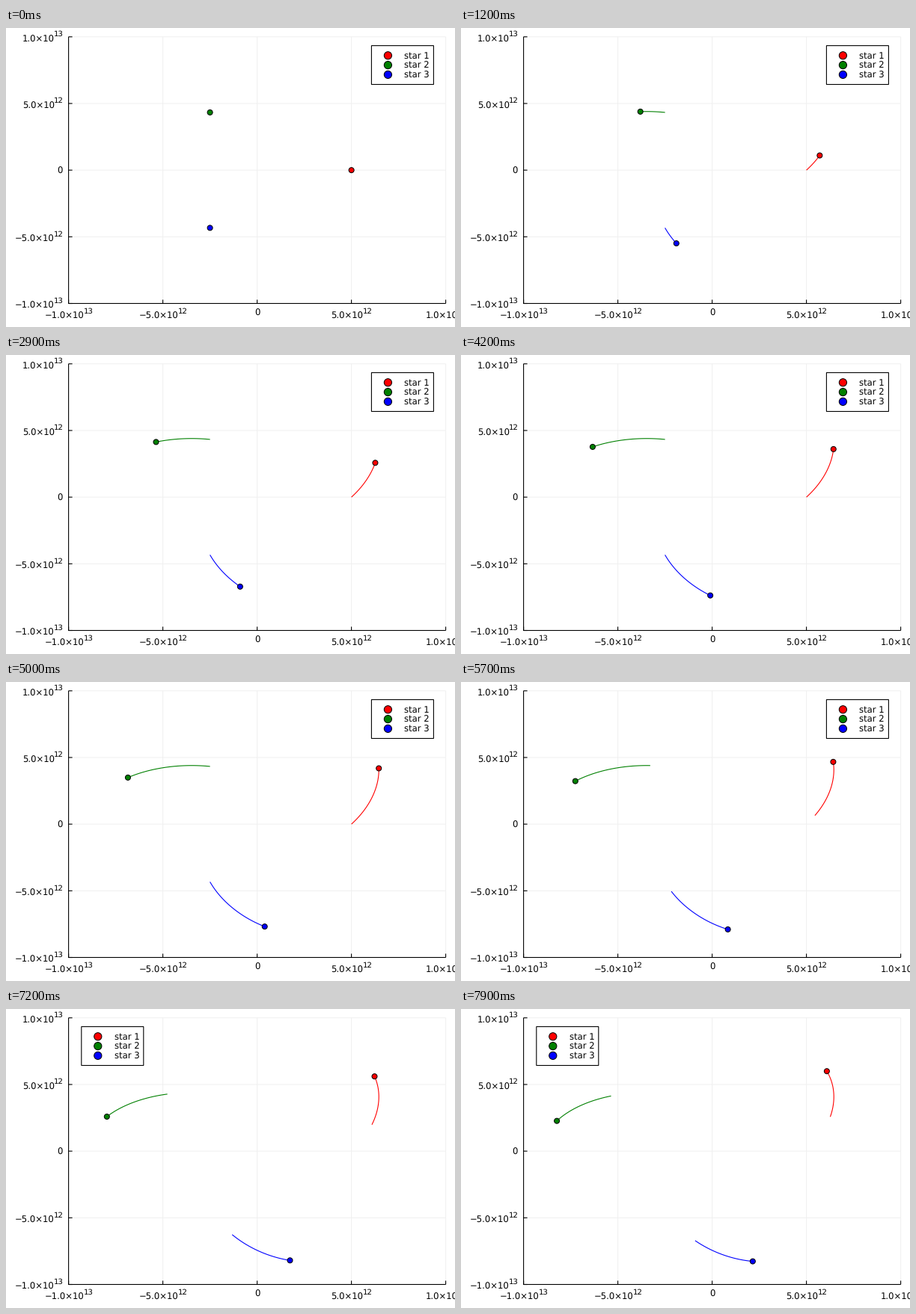
These frames come from a looping animation (600 by 400 pixels, 8000 ms). A matplotlib script:

```python
import numpy as np
import matplotlib.pyplot as plt
from matplotlib.animation import FuncAnimation
from matplotlib.patches import Circle, Rectangle

plt.rcParams["font.family"] = "DejaVu Sans"
plt.rcParams["text.hinting"] = "none"

W, H, DPI = 600, 400, 100
FRAMES, TRAIL, LEGEND_MOVE = 80, 50, 62
PT = 72 / DPI                      # points per pixel
COLORS = ["#ff0000", "#008000", "#0000ff"]
LEFT, RIGHT, TOP, BOTTOM = 83.6, 587.6, 11.8, 368.5
FONT, SUP = 11.6, 10.1
BOX_X, KEY_X, NAME_X = 488.4, 510.4, 532.3


def px(x):
    return (LEFT + RIGHT) / 2 + (RIGHT - LEFT) / 20 * x


def py(y):
    return (TOP + BOTTOM) / 2 - (BOTTOM - TOP) / 20 * y


def orbit(pos, vel, k, steps, sub=20):
    """Leapfrog path around the common centre, one point per frame."""
    dt = 1 / sub
    path = [pos]
    for _ in range(steps - 1):
        for _ in range(sub):
            vel -= k * pos / abs(pos) ** 3 * dt / 2
            pos += vel * dt
            vel -= k * pos / abs(pos) ** 3 * dt / 2
        path.append(pos)
    return np.array(path)


base = orbit(5 + 0j, 0.0722 + 0.0927j, 0.0627, FRAMES)
paths = [base * np.exp(2j * np.pi * i / 3) for i in range(3)]

fig = plt.figure(figsize=(W / DPI, H / DPI), dpi=DPI, facecolor="white")
ax = fig.add_axes([0, 0, 1, 1])
ax.set_xlim(0, W)
ax.set_ylim(H, 0)
ax.axis("off")


def line(x, y, color="black", width=1.1, z=1):
    return ax.plot(x, y, color=color, lw=width * PT, zorder=z, snap=False,
                   solid_capstyle="butt")[0]


def dot(x, y, color, radius, z):
    return ax.add_patch(Circle((x, y), radius, fc=color, ec="black", lw=PT,
                               zorder=z))


def text(x, y, s, size=FONT, z=1):
    return ax.text(x, y, s, fontsize=size * PT, va="baseline", zorder=z)


def power(join, y, value):
    """Label in scientific form; the exponent starts near x = join."""
    sign = "\u2212" if value < 0 else ""
    mantissa, exp = ("1.0", "13") if abs(value) == 10 else ("5.0", "12")
    ems = 4.538 if sign else 3.70
    text(join - ems * FONT, y, f"{sign}{mantissa}\u00d710")
    text(join - 0.7, y - 7.2, exp, SUP)


for v in (-10, -5, 0, 5, 10):
    x, y = px(v), py(v)
    line([x, x], [TOP, BOTTOM], "#f0f0f0", 1, 0)
    line([LEFT, RIGHT], [y, y], "#f0f0f0", 1, 0)
    line([x, x], [BOTTOM, BOTTOM - 5])
    line([LEFT, LEFT + 5], [y, y])
    if v:
        power(x + (20.7 if v < 0 else 15.8), 389.2, v)
        power(64.9, y + 6.6, v)
    else:
        text(x - 3.5, 385.1, "0")
        text(68.3, y + 4.4, "0")
line([LEFT, LEFT], [TOP, BOTTOM + 0.5])
line([LEFT, RIGHT], [BOTTOM, BOTTOM])

trails = [line([], [], c, 1.1, 3 + 2 * i) for i, c in enumerate(COLORS)]
stars = [dot(0, 0, c, 3.5, 4 + 2 * i) for i, c in enumerate(COLORS)]

frame_box = ax.add_patch(Rectangle((BOX_X, 23.6), 83, 51.9, fc="white",
                                   ec="black", lw=1.1 * PT, snap=False,
                                   zorder=10))
keys = [dot(KEY_X, 36.8 + 12.8 * i, c, 5.1, 11) for i, c in enumerate(COLORS)]
names = [text(NAME_X, 41.2 + 13 * i, f"star {i + 1}", z=11) for i in range(3)]


def place_legend(shift):
    frame_box.set_x(BOX_X + shift)
    for key, name in zip(keys, names):
        key.center = KEY_X + shift, key.center[1]
        name.set_x(NAME_X + shift)


def update(n):
    place_legend(-387.6 if n >= LEGEND_MOVE else 0)
    for path, trail, star in zip(paths, trails, stars):
        part = path[max(0, n - TRAIL):n + 1]
        x, y = px(part.real), py(part.imag)
        trail.set_data(x, y)
        star.center = x[-1], y[-1]
    return [*trails, *stars, frame_box, *keys, *names]


anim = FuncAnimation(fig, update, frames=FRAMES, interval=100, repeat=True,
                     repeat_delay=0, blit=False)
plt.show()
```
